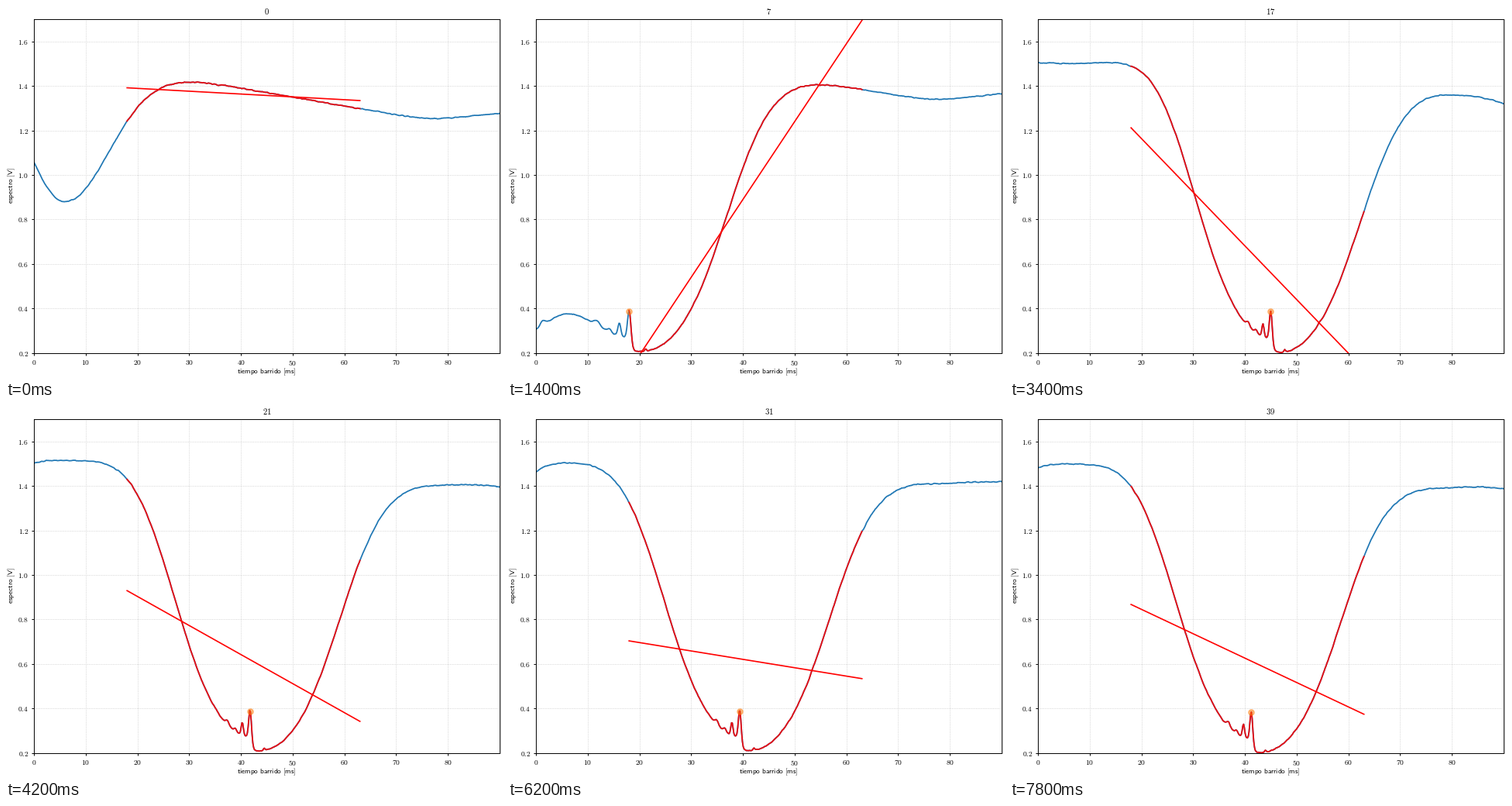
Animation, 640 px wide and 480 px high, one loop 8 s. Source, as a matplotlib script:

```python
import numpy as np
import matplotlib.pyplot as plt
from matplotlib.animation import FuncAnimation

plt.rcParams["mathtext.fontset"] = "cm"

W, H, DPI = 640, 480, 100
FRAMES, INTERVAL = 40, 200
T_MAX, WIN = 90, (18, 63)


def bump(s, centre, height, width):
    return height * np.exp(-0.5 * ((s - centre) / width) ** 2)


def spectrum(s):
    """Voltage behind a broad absorption dip, with narrow peaks inside it."""
    power = 1.576 - 0.00085 * (s + 3.3) - 0.00335 * np.abs(s + 3.3)
    left = np.exp(0.56 - 0.006 * s ** 2 - 4.07e-9 * s ** 6)
    right = np.exp(0.7 - 0.0051 * (s - 1.5) ** 2)
    mix = 0.5 + 0.5 * np.tanh((s - 0.35) / 0.4)
    level = power * np.exp(-left - (right - left) * mix)
    return (level + bump(s, 0, 0.13, 0.25) + bump(s, -1.45, 0.058, 0.2)
            + bump(s, -2.75, 0.014, 0.25) + bump(s, -4.2, 0.02, 0.3)
            + bump(s, 2.6, 0.01, 0.15))


def sweep(t):
    """Scan position: turns round near 6 ms and again near 78 ms."""
    left = np.minimum(t, 78) - 6
    left = np.where(left < 0, 1.22 * left, left)
    before = np.minimum(t - 78, 0)
    after = np.maximum(t - 78, 0)
    rise = np.sqrt(left ** 2 + 88) - before - np.sqrt(before ** 2 + 25)
    return rise - (np.sqrt((0.44 * after) ** 2 + 25) - 5)


def peak_position(n):
    """Steady ramp, then a slowly damped swing about the lock point."""
    ramp = -8.4 + 3.35 * n
    swing = 4.9 * np.exp((21 - n) / 60) * np.cos(2 * np.pi * (n - 17.7) / 18)
    return min(ramp, 34.65 + swing)


t = np.linspace(0, T_MAX, 601)
u = sweep(t)
inside = (t >= WIN[0]) & (t <= WIN[1])
rising = (t >= 6) & (t <= 78)
back = 0.016 * np.maximum(t - 78, 0) / 12


def signal(n):
    centre = peak_position(n)
    drift = np.cos(2 * np.pi * (n - 26) / 26)
    noise = np.random.default_rng(n).normal(0, 0.0022, t.size)
    noise = np.convolve(noise, np.ones(4) / 4, "same")
    level = spectrum(u - centre)
    return centre, level * (1 + 0.004 * drift) + 0.005 * drift + back + noise


def sans(text):
    return r"$\mathsf{" + text.replace(" ", r"\ ") + "}$"


fig = plt.figure(figsize=(W / DPI, H / DPI), dpi=DPI, facecolor="white")
ax = fig.add_axes([36 / W, 32.2 / H, 601 / W, 430.8 / H])
ax.set_xlim(0, T_MAX)
ax.set_ylim(0.2, 1.7)
xticks = range(0, 90, 10)
yticks = np.arange(0.2, 1.7, 0.2)
ax.set_xticks(xticks, [f"${v}$" for v in xticks])
ax.set_yticks(yticks, [f"${v:.1f}$" for v in yticks])
ax.tick_params(labelsize=6.9, length=2.5, width=0.7, pad=2.4)
ax.grid(color="#c8c8c8", linestyle=":", linewidth=0.6)
ax.set_axisbelow(True)
for spine in ax.spines.values():
    spine.set_linewidth(0.7)

fig.text(336.5 / W, 7.3 / H, sans("tiempo barrido [ms]"), size=6.7,
         ha="center", va="center")
fig.text(7.5 / W, 248 / H, sans("espectro [V]"), size=6.7, rotation=90,
         ha="center", va="center")
title = fig.text(336.5 / W, 469 / H, "", size=7.7, ha="center", va="baseline")

trace, = ax.plot([], [], color="#1f77b4", lw=1.25)
window, = ax.plot([], [], color="red", alpha=0.9, lw=1.3)
fit, = ax.plot([], [], color="red", lw=1.2)
peak, = ax.plot([], [], "o", color="#ff7f0e", alpha=0.5, ms=5.2)


def draw(n):
    centre, y = signal(n)
    trace.set_data(t, y)
    window.set_data(t[inside], y[inside])
    slope, base = np.polyfit(t[inside], y[inside], 1)
    ends = np.array(WIN)
    fit.set_data(ends, slope * ends + base)
    at = np.interp(centre, u[rising], t[rising])
    peak.set_data([at], [np.interp(at, t, y)])
    peak.set_visible(at > WIN[0] - 0.1)
    title.set_text(sans(str(n)))
    return trace, window, fit, peak, title


anim = FuncAnimation(fig, draw, frames=FRAMES, interval=INTERVAL,
                     init_func=lambda: draw(0), repeat=True, repeat_delay=0)
plt.show()
```
